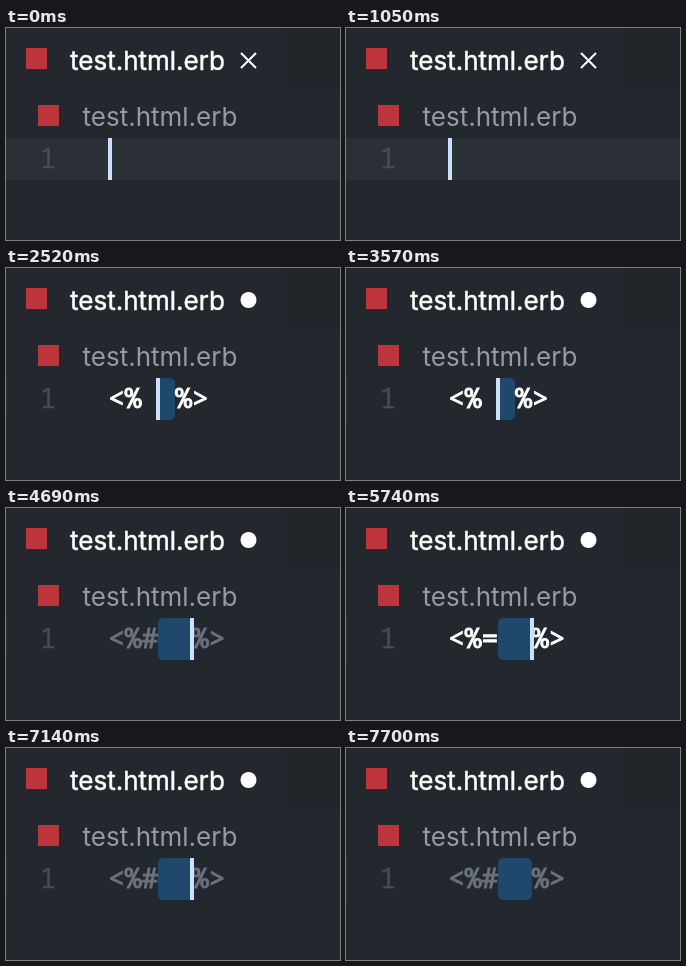
These frames come from a looping animation (334x212 px, 8190 ms). An HTML page:

```html
<!DOCTYPE html>
<html lang="en">
<head>
<meta charset="utf-8">
<title>Tag toggling in an editor</title>
<style>
  html, body { margin: 0; width: 100%; height: 100%; overflow: hidden; background: #23282e; }
  svg { display: block; width: 100vw; height: 100vh; }
  .ui { font: 400 26px Inter, "Open Sans", sans-serif; }
  .code { font: 28px "Noto Sans Mono", "DejaVu Sans Mono", monospace; white-space: pre; }
  .tab { fill: #fff; stroke: #fff; stroke-width: .5; }
  #text { fill: currentColor; stroke: currentColor; stroke-width: 1; }
</style>
</head>
<body>
<svg viewBox="0 0 334 212" xmlns="http://www.w3.org/2000/svg">
  <rect width="334" height="212" fill="#23282e"/>
  <rect x="275" width="59" height="66" fill="#21262b"/>

  <rect x="20" y="20" width="21" height="21" fill="#bd343b"/>
  <text class="ui tab" x="64" y="42">test.html.erb</text>
  <path id="close" d="M235 25L250 40M250 25L235 40" stroke="#fff" stroke-width="2"/>
  <circle id="dirty" cx="242.5" cy="32" r="8" fill="#fff"/>

  <rect x="32" y="77" width="21" height="21" fill="#bd343b"/>
  <text class="ui" x="76.5" y="98" fill="#959ba3">test.html.erb</text>

  <rect id="line" y="110" width="334" height="42" fill="#2b3036"/>
  <rect y="110" width="1" height="42" fill="#30353b"/>
  <text class="code" x="33.5" y="140" fill="#444d56" stroke="#444d56" stroke-width=".4">1</text>
  <g id="brackets" fill="#086969">
    <rect x="102" y="110" width="16.5" height="42"/>
    <rect x="203" y="110" width="16.5" height="42"/>
  </g>
  <rect id="selection" y="110" height="42" rx="5" fill="#1f486c"/>
  <text id="text" class="code" x="102" y="140"></text>
  <rect id="caret" y="110" width="4" height="42" fill="#c8e1ff"/>
</svg>
<script>
  const LOOP = 8190, LEFT = 102, ADVANCE = 16.8;
  const COLOR = { plain: '#fff', comment: '#6a737d' };

  // Each edit: start time, text, caret column, selected columns.
  const edits = [
    { at: 0, text: '', caret: 0 },
    { at: 1120, text: '<%=  %>', caret: 4 },
    { at: 2520, text: '<%  %>', caret: 3, select: [3, 4] },
    { at: 3640, text: '<%#  %>', caret: 5, select: [3, 5] },
    { at: 4760, text: '<%=  %>', caret: 5, select: [3, 5] },
    { at: 5950, text: '<%  %>', caret: 3, select: [3, 4] },
    { at: 7140, text: '<%#  %>', caret: 5, select: [3, 5] }
  ];

  // Moments when the caret is hidden and shown again.
  const blinks = [
    [490, 1050], [1610, 2100], [3010, 3570], [4200, 4690],
    [5250, 5740], [6440, 7000], [7700, LOOP]
  ];

  const $ = id => document.getElementById(id);
  const column = n => Math.round(LEFT + n * ADVANCE);
  const show = (id, on) => $(id).setAttribute('visibility', on ? 'visible' : 'hidden');

  function render(t) {
    const edit = edits.findLast(e => e.at <= t);
    const { text, caret, select } = edit;
    const dirty = text !== '';

    show('close', !dirty);
    show('dirty', dirty);
    show('line', !select);
    show('brackets', dirty && !select);
    show('selection', !!select);
    show('caret', !blinks.some(([off, on]) => t >= off && t < on));

    $('text').textContent = text.replaceAll(' ', '\u00a0');
    $('text').setAttribute('color', text.includes('#') ? COLOR.comment : COLOR.plain);
    $('caret').setAttribute('x', column(caret) - (caret ? 2 : 0));
    if (select) {
      const [from, to] = select.map(column);
      $('selection').setAttribute('x', from);
      $('selection').setAttribute('width', to - from);
    }
  }

  const start = performance.now();
  function tick() {
    render((performance.now() - start) % LOOP);
    requestAnimationFrame(tick);
  }
  tick();
</script>
</body>
</html>
```
